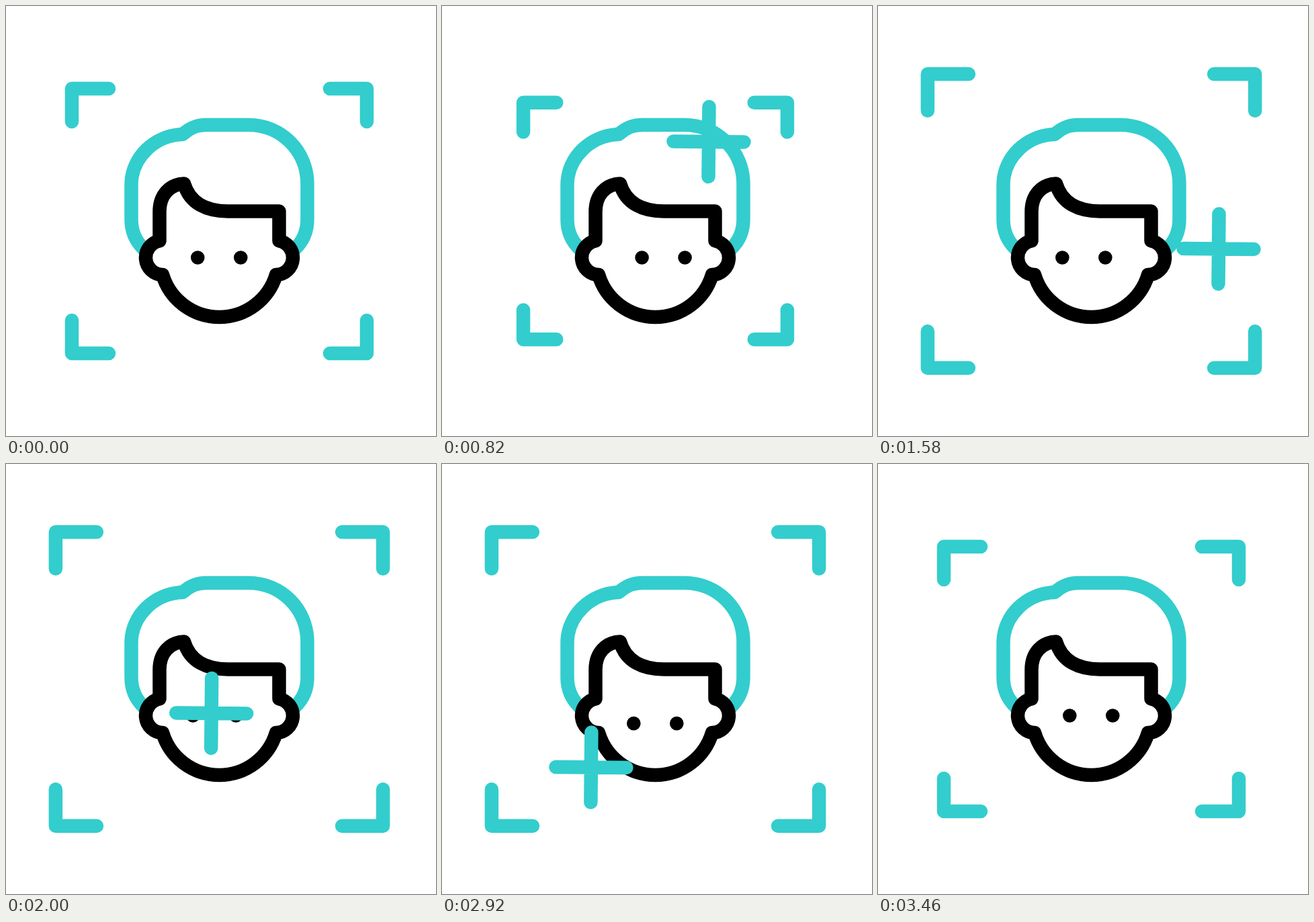
An HTML page that plays this animation: 640x640 px, repeating every 3600 ms.

```html
<!DOCTYPE html>
<html lang="en">
<head>
<meta charset="utf-8">
<title>Face scan</title>
<style>
  html, body { margin: 0; width: 100%; height: 100%; overflow: hidden; background: #fff; }
  svg { display: block; width: 640px; height: 640px; }
  path { fill: none; stroke-width: 20.5; stroke-linecap: round; stroke-linejoin: round; }
  .teal { stroke: #33cdcd; }
  .black { stroke: #000; }
</style>
</head>
<body>
<svg viewBox="0 0 640 640">
  <path class="teal" id="brackets"/>
  <path class="teal" style="stroke-linecap:butt" d="M205 361.5C193 350 186.5 335 186.5 318V266C186.5 225 222 192 263 191
    C273 182 283 177 299 177H361C410 177 448.5 216 448.5 265V318C448.5 335 442 350 430 361.5"/>
  <path class="black" d="M228.5 349.5V306C228.5 281 244 265 265 264.5C274 295 300 305.5 330 305.5H406.5V349.5
    A25.5 25.5 0 0 1 402 400A88.2 88.2 0 0 1 233 400A25.5 25.5 0 0 1 228.5 349.5"/>
  <g id="eyes"><circle cx="285.3" cy="374.5" r="10.3"/><circle cx="349.3" cy="374.5" r="10.3"/></g>
  <path class="teal" id="plus" d="M-52.5-.5L52.5.5M.5-52L-.5 52"/>
</svg>
<script>
const LOOP = 3600, HOLD = 120, STEP = 20, LAST = 167;
const [brackets, eyes, plus] = ['brackets', 'eyes', 'plus'].map(id => document.getElementById(id));

const ease = u => (u = Math.min(1, Math.max(0, u)), u * u * (3 - 2 * u));

// Starts at the first value and eases to each next one between its two times.
const glide = (k, times, values) => values.slice(1).reduce((sum, v, i) =>
  sum + (v - values[i]) * ease((k - times[i]) / (times[i + 1] - times[i])), values[0]);

// Out to one side, across to the other, and back to rest.
const glance = (k, times, reach) => glide(k, times, [0, reach, -reach, 0]);

const stops = {
  time: [17, 35, 73, 113, 139, 163],
  x: [161, 397, 507, 132.5, 220.5, 493.5],
  y: [194, 202, 361.5, 379, 451.5, 446.5]
};

function corner(sx, sy, scale) {
  const x = n => 317.5 + sx * n * scale, y = n => 320 + sy * n * scale;
  return `M${x(219.5)} ${y(148)}V${y(197)}H${x(164.5)}`;
}

function move(node, x, y) {
  node.setAttribute('transform', `translate(${x} ${y})`);
}

function draw(now) {
  const k = Math.min(LAST, Math.max(0, Math.floor((now % LOOP - HOLD) / STEP)));
  const scale = glide(k / 17.5, [0, 1, 2, 3, 8, 9.2], [1, 1.142, .895, 1.11, 1.11, 1]);
  brackets.setAttribute('d', [-1, 1].flatMap(sx => [-1, 1].map(sy => corner(sx, sy, scale))).join(''));
  move(eyes, glance(k, [20, 46, 85, 100], 20), glance(k, [100, 116, 150, 162], -20));
  move(plus, glide(k, stops.time, stops.x), glide(k, stops.time, stops.y));
  plus.setAttribute('opacity', ease((k - 13) / 10) * ease((LAST - k) / 8));
}

const start = performance.now();
function tick() {
  draw(performance.now() - start);
  requestAnimationFrame(tick);
}
tick();
</script>
</body>
</html>
```
